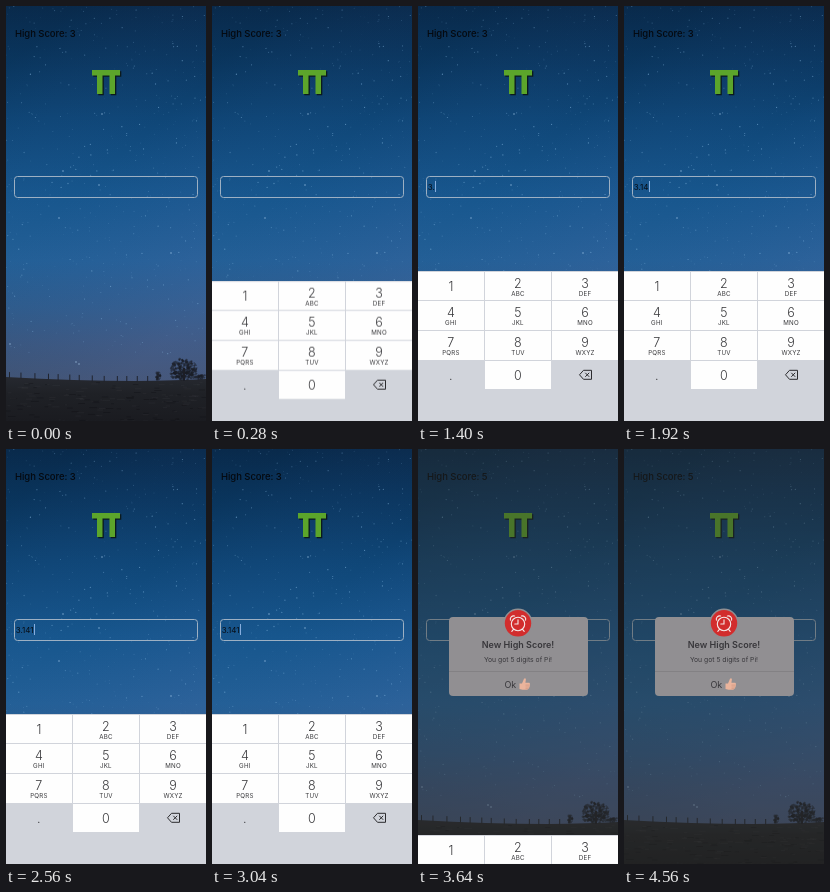
These frames come from a looping animation (200x415 px, 4600 ms). An HTML page with a canvas:

```html
<!DOCTYPE html>
<html lang="en">
<head>
<meta charset="utf-8">
<title>Pi digits</title>
<style>
  :root { --loop: 4600ms; }
  html, body { margin: 0; width: 100%; height: 100%; overflow: hidden; background: #0a2a4c; }
  #stage { position: relative; width: 200px; height: 415px; overflow: hidden; font-family: Inter, "Open Sans", sans-serif; }
  #stage > * { position: absolute; }
  canvas, .art { left: 0; top: 0; width: 200px; height: 415px; }

  .score { left: 9px; top: 20px; font-size: 9.5px; font-weight: 500; line-height: 15px; letter-spacing: -.05px; color: #05090f; white-space: pre; }
  .score i { font-style: normal; }
  .score i::after { content: "3"; animation: score var(--loop) step-end infinite; }
  @keyframes score { 0% { content: "3"; } 73.91% { content: "5"; } }

  .field { left: 8px; top: 169.5px; width: 182px; height: 20.5px; border: 1px solid #9db0c3; border-radius: 3.5px;
    font-size: 8px; line-height: 21px; color: #070b12; white-space: pre; }
  .typed { position: absolute; left: .7px; top: 0; }
  .typed::before { content: ""; animation: type var(--loop) step-end infinite; }
  .typed::after { content: ""; display: inline-block; width: 1px; height: 11px; margin-left: .4px; vertical-align: -2px;
    background: #86addd; animation: caret var(--loop) step-end infinite; }
  @keyframes type {
    0% { content: ""; }
    26.1% { content: "3."; }
    33.9% { content: "3.1"; }
    40% { content: "3.14"; }
    53.9% { content: "3.141"; }
    68.7% { content: "3.1415"; }
    73.91% { content: ""; }
  }
  @keyframes caret {
    0% { opacity: 0; }
    9% { opacity: 1; }
    19% { opacity: 0; }
    26.1% { opacity: 1; }
    47% { opacity: 0; }
    53.9% { opacity: 1; }
    73.91% { opacity: 0; }
  }

  .dim { inset: 0; background: #2d2d29; opacity: 0; animation: dim var(--loop) linear infinite; }
  @keyframes dim { 0%, 73.91% { opacity: 0; } 78.26%, 100% { opacity: .4; } }
  .alert { left: 0; top: 0; width: 200px; height: 415px; opacity: 0; animation: alert var(--loop) linear infinite; }
  @keyframes alert { 0%, 73.91% { opacity: 0; } 78.26%, 100% { opacity: 1; } }
  .alert text { text-anchor: middle; fill: #38373b; }

  .pad { left: 0; top: 265px; width: 200px; height: 150px; background: #d1d4db; transform: translateY(151px);
    animation: pad var(--loop) infinite; }
  @keyframes pad {
    0% { transform: translateY(151px); animation-timing-function: cubic-bezier(.22, .6, .22, 1); }
    10.87%, 75.3% { transform: none; animation-timing-function: cubic-bezier(.22, .6, .22, 1); }
    86.2%, 100% { transform: translateY(151px); }
  }
  .key { position: absolute; width: 65.7px; height: 28.6px; text-align: center; color: #3a3a3d; }
  .key.white { background: #fefefe; }
  .key b { position: absolute; left: 0; right: 0; top: 4px; font-weight: 300; font-size: 12.5px; line-height: 15px; }
  .key.lone b { top: 7.5px; }
  .key small { position: absolute; left: 0; right: 0; top: 18px; font-size: 6.2px; line-height: 8px; letter-spacing: .2px; }
  .pad svg { position: absolute; left: 160px; top: 98px; }
</style>
</head>
<body>
<div id="stage">
  <canvas id="sky" width="200" height="415"></canvas>
  <div class="score">High Score: <i></i></div>
  <svg class="art" viewBox="0 0 200 415">
    <defs><path id="pi" d="M86 64H114V69.500H109V88H103.500V69.500H96.500V88H91V69.500H86Z"/></defs>
    <use href="#pi" x="1.300" y="1.300" fill="#0b1a1d"/>
    <use href="#pi" fill="#5ca52b"/>
  </svg>
  <div class="field"><span class="typed"></span></div>
  <div class="dim"></div>
  <svg class="alert" viewBox="0 0 200 415">
    <rect x="31" y="168" width="139" height="79" rx="4" fill="#918f92"/>
    <circle cx="100" cy="174.300" r="14.700" fill="#918f92"/>
    <circle cx="100" cy="174.300" r="13.200" fill="#d22d2d"/>
    <g fill="none" stroke="#f5e9e8" stroke-width="1.100" stroke-linecap="round">
      <circle cx="100" cy="175" r="6.700"/>
      <path d="M100 170.800V175H96.800M95.500 180.300L93.800 182.300M104.500 180.300L106.200 182.300"/>
      <path d="M92.400 171.200A3.400 3.400 0 0 1 96.600 167M107.600 171.200A3.400 3.400 0 0 0 103.400 167"/>
    </g>
    <text x="100" y="199.300" font-size="9" font-weight="600">New High Score!</text>
    <text x="100" y="212.500" font-size="6.800">You got 5 digits of Pi!</text>
    <path d="M31 222.500H170" stroke="#7d7b7f" stroke-width=".7"/>
    <text x="92.300" y="238.500" font-size="9">Ok</text>
    <path d="M101.500 234.500H104L106 229.800Q107.500 228.200 107.900 230.500L107.400 233.800H111.300Q112.800 235 111.700 236Q112.400 237.200 111.300 238Q111.600 239.400 110.300 239.700Q110 240.800 108.800 240.800H104.500L101.500 240Z" fill="#eab49c"/>
    <path d="M107.500 236.100H111.300M107.500 238H111M107.500 239.700H110" stroke="#c08570" stroke-width=".5"/>
  </svg>
  <div class="pad" id="pad">
    <svg width="16" height="12" viewBox="0 0 16 12" fill="none" stroke="#2b2b2e" stroke-width="1" stroke-linejoin="round">
      <path d="M1.500 5.800L5.500 1.300H13.500V10.300H5.500ZM7.300 3.800L11.200 7.800M11.200 3.800L7.300 7.800"/>
    </svg>
  </div>
</div>
<script>
  const pad = document.getElementById('pad');
  const keys = ['1', '2 ABC', '3 DEF', '4 GHI', '5 JKL', '6 MNO', '7 PQRS', '8 TUV', '9 WXYZ', '.', '0'];
  keys.forEach((label, i) => {
    const [digit, letters] = label.split(' ');
    const key = document.createElement('div');
    key.className = 'key' + (digit === '.' ? '' : ' white') + (letters ? '' : ' lone');
    key.style.left = (i % 3) * 67.1 + 'px';
    key.style.top = Math.floor(i / 3) * 29.8 + .5 + 'px';
    key.innerHTML = `<b>${digit}</b>` + (letters ? `<small>${letters}</small>` : '');
    pad.append(key);
  });

  const c = document.getElementById('sky').getContext('2d');
  let seed = 314;
  const rand = () => (seed = seed * 16807 % 2147483647) / 2147483647;
  const dot = (x, y, r, color) => {
    c.fillStyle = color;
    c.beginPath();
    c.arc(x, y, r, 0, Math.PI * 2);
    c.fill();
  };
  const wash = (gradient, stops) => {
    stops.forEach(([at, color]) => gradient.addColorStop(at, color));
    c.fillStyle = gradient;
    c.fillRect(0, 0, 200, 415);
  };

  wash(c.createLinearGradient(0, 0, 0, 375), [
    [0, '#0a2a4c'], [.13, '#0b365f'], [.3, '#0f4677'], [.5, '#17568d'],
    [.68, '#235f96'], [.8, '#2d5b8b'], [.9, '#38557c'], [1, '#3e506d']
  ]);
  // the lower right is paler, the upper left deeper
  wash(c.createLinearGradient(0, 60, 200, 300), [
    [0, 'rgba(0,40,70,.14)'], [.45, 'rgba(60,100,170,0)'], [1, 'rgba(100,115,175,.22)']
  ]);

  // faint field of stars, thinner near the horizon
  for (let i = 0; i < 480; i++) {
    const y = 350 * Math.pow(rand(), 1.1);
    dot(rand() * 200, y, .3 + rand() * .35, `rgba(140,190,230,${.12 + rand() * .45})`);
  }
  const bright = [[93, 179], [4, 338], [70, 356], [73, 358], [96, 108], [57, 165], [165, 247], [53, 212]];
  bright.forEach(([x, y]) => dot(x, y, .75, 'rgba(180,215,245,.7)'));

  // ground
  const ground = c.createLinearGradient(0, 370, 0, 415);
  ground.addColorStop(0, '#262930');
  ground.addColorStop(.4, '#1f2126');
  ground.addColorStop(1, '#1a1b20');
  c.fillStyle = ground;
  c.beginPath();
  c.moveTo(0, 371);
  c.quadraticCurveTo(70, 375, 130, 375);
  c.quadraticCurveTo(170, 374.5, 200, 373);
  c.lineTo(200, 415);
  c.lineTo(0, 415);
  c.fill();
  for (let i = 0; i < 160; i++) {
    c.fillStyle = rand() > .5 ? 'rgba(70,70,75,.18)' : 'rgba(5,5,10,.22)';
    c.fillRect(rand() * 200, 376 + rand() * 39, 2 + rand() * 6, 1);
  }

  // fence
  c.fillStyle = '#20242e';
  for (let x = 3; x < 148; x += 9 + rand() * 5) {
    const base = 371 + 4 * Math.min(1, x / 100);
    c.fillRect(x, base - 5, 1, 6);
  }

  // trees: leaves gathered in an ellipse
  const tree = (x, y, w, h, n) => {
    for (let i = 0; i < n; i++) {
      const a = rand() * Math.PI * 2, d = Math.sqrt(rand());
      dot(x + Math.cos(a) * d * w, y + Math.sin(a) * d * h, .6 + rand() * .9, 'rgba(27,30,38,.6)');
    }
  };
  tree(178, 362.5, 13, 10, 190);
  tree(178, 369, 14, 4.5, 70);
  tree(152, 370, 3, 4, 22);
  tree(195, 371, 5, 2.5, 22);
  c.fillStyle = '#1c1e26';
  c.fillRect(177, 362, 2, 13);
</script>
</body>
</html>
```
